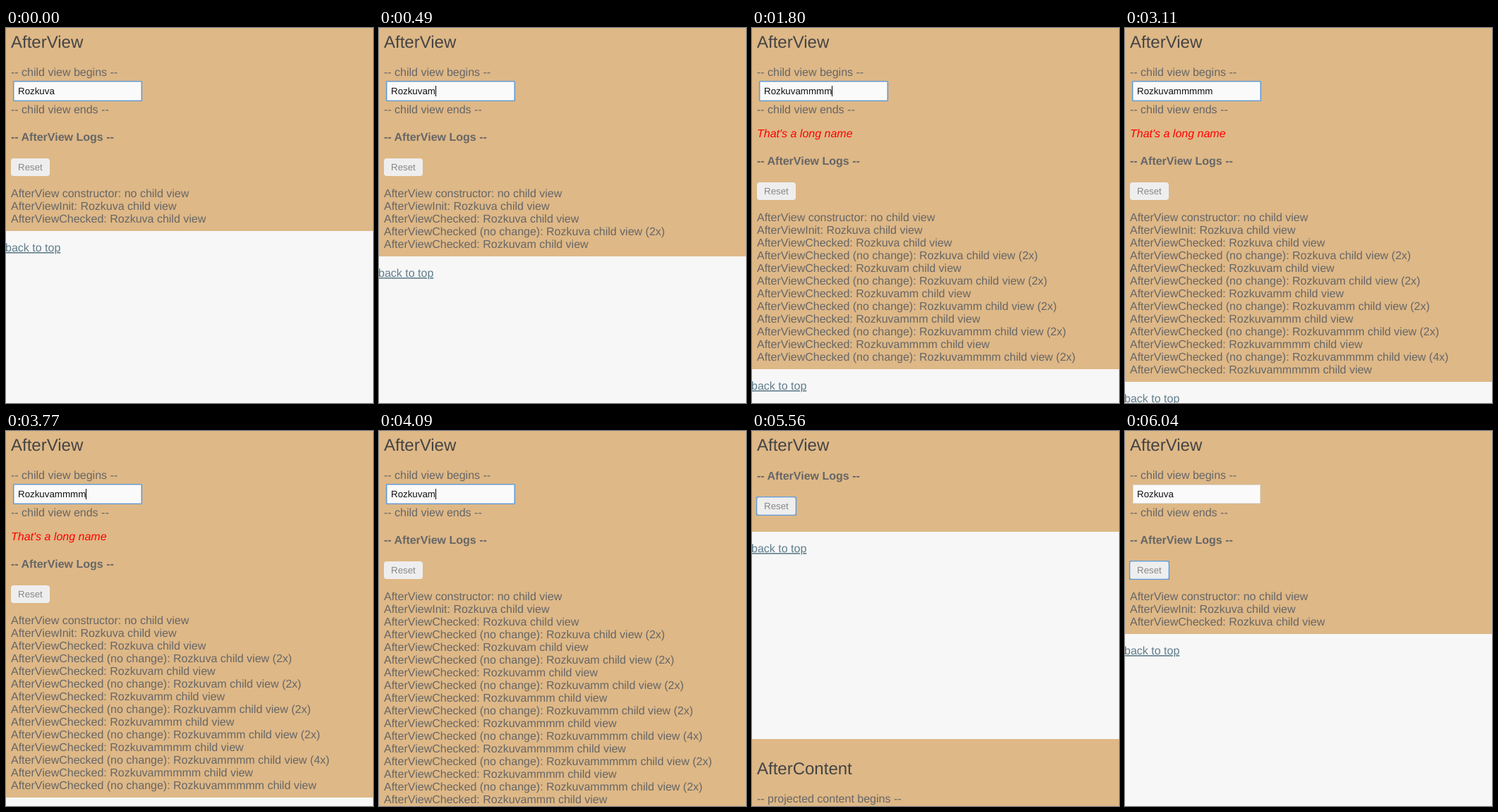
These frames come from a looping animation (520 px wide and 532 px high, 6540 ms). An HTML page:

```html
<!DOCTYPE html>
<html lang="en">
<head>
<meta charset="utf-8">
<title>AfterView</title>
<style>
  html, body { margin: 0; width: 100%; height: 100%; overflow: hidden; background: #f7f7f7; }
  svg { display: block; width: 520px; height: 532px; }
  text { font: 16px "Liberation Sans", Arial, sans-serif; fill: #666; text-rendering: geometricPrecision; }
  .title { font-size: 24px; fill: #444; }
  .bold { font-weight: bold; }
  .note { font-style: italic; fill: #f00; }
  .small { font-size: 13.333px; }
  .value { fill: #111; }
  .label { fill: #888; }
  .link { fill: #607d8b; text-decoration: underline; }
  .panel { fill: #deb887; }
  .field { fill: #fafafa; stroke: #ddd; }
  .button { fill: #eee; }
  .button.hover { fill: #cfd8dc; }
  .ring { fill: none; stroke: #5b9bdd; stroke-width: 1.4; }
</style>
</head>
<body>
<svg id="stage" viewBox="0 0 520 532">
  <rect class="panel" id="panel" width="520"/>
  <text class="title" x="7" y="28">AfterView</text>
  <g id="child">
    <text x="7" y="68">-- child view begins --</text>
    <rect class="field" x="11.5" y="76.5" width="180" height="26"/>
    <rect class="ring" id="fieldRing" x="10.6" y="75.6" width="181.8" height="27.8" rx="1"/>
    <text class="small value" id="value" x="17" y="94"></text>
    <rect id="caret" y="82" width="1" height="15"/>
    <text x="7" y="121">-- child view ends --</text>
  </g>
  <text class="note" id="note" x="7" y="155">That's a long name</text>
  <g id="logs">
    <text class="bold" x="7" y="160">-- AfterView Logs --</text>
    <rect class="button" id="button" x="7" y="185" width="55" height="25" rx="4"/>
    <rect class="ring" id="buttonRing" x="6.6" y="184.6" width="55.8" height="25.8" rx="1"/>
    <text class="small label" x="17" y="202">Reset</text>
    <g id="lines"></g>
  </g>
  <g id="below">
    <text class="link" x="-1" y="29">back to top</text>
    <g transform="translate(0 294)">
      <rect class="panel" width="520" height="300"/>
      <text class="title" x="7" y="50">AfterContent</text>
      <text x="7" y="90">-- projected content begins --</text>
    </g>
  </g>
</svg>
<script>
const LOOP = 6540;
const $ = id => document.getElementById(id);
const name = n => "Rozkuva" + "m".repeat(n);

// Each step lists only what changes; "typed" is the count of extra letters,
// "last" the repeat count of the newest log line.
const steps = [
  { at: 0, typed: 0, rows: 3, last: 2, caret: false, note: false, focus: "field", hover: false, child: true },
  { at: 330, typed: 1, rows: 4, last: 1, caret: true },
  { at: 490, rows: 5 },
  { at: 820, typed: 2, rows: 6 },
  { at: 980, rows: 7 },
  { at: 1140, typed: 3, rows: 9 },
  { at: 1470, typed: 4, rows: 10 },
  { at: 1800, rows: 12, last: 2, note: true },
  { at: 1960, typed: 5, rows: 13 },
  { at: 2120, caret: false },
  { at: 2780, caret: true },
  { at: 3110, caret: false },
  { at: 3610, typed: 4, rows: 14, last: 1, caret: true },
  { at: 3930, typed: 3, rows: 15 },
  { at: 4090, typed: 1, rows: 17, note: false },
  { at: 4910, caret: false },
  { at: 5070, hover: true },
  { at: 5230, focus: "button" },
  { at: 5560, rows: 0, hover: false, child: false },
  { at: 5720, typed: 0, rows: 3, child: true },
  { at: 5880, hover: true },
  { at: 6040, hover: false }
];
let previous = {};
const states = steps.map(step => previous = { ...previous, ...step });

// Letter counts in the order the hook reported them
const checked = [0, 1, 2, 3, 4, 5, 4, 3];
const intro = [
  "AfterView constructor: no child view",
  `AfterViewInit: ${name(0)} child view`,
  `AfterViewChecked: ${name(0)} child view`
];

function logLine(i, state) {
  if (i < 3) return intro[i];
  const k = (i - 3) >> 1;
  if (i % 2 === 0) return `AfterViewChecked: ${name(checked[k + 1])} child view`;
  const times = i === state.rows - 1 ? state.last : k === 4 ? 4 : 2;
  const suffix = times > 1 ? ` (${times}x)` : "";
  return `AfterViewChecked (no change): ${name(checked[k])} child view${suffix}`;
}

const show = (id, on) => $(id).setAttribute("visibility", on ? "inherit" : "hidden");
const moveY = (id, y) => $(id).setAttribute("transform", `translate(0 ${y})`);

function draw(state) {
  const shift = !state.child ? -91 : state.note ? 34 : 0;
  const bottom = 234 + shift + 18 * state.rows;
  $("panel").setAttribute("height", bottom);
  moveY("logs", shift);
  moveY("below", bottom);

  show("child", state.child);
  show("note", state.note);
  show("caret", state.caret);
  show("fieldRing", state.child && state.focus === "field");
  show("buttonRing", state.focus === "button");
  $("button").classList.toggle("hover", state.hover);

  $("value").textContent = name(state.typed);
  $("caret").setAttribute("x", Math.floor(68.9 + 11.1 * state.typed));
  $("lines").innerHTML = Array.from({ length: state.rows }, (_, i) =>
    `<text x="7" y="${240 + 18 * i}">${logLine(i, state)}</text>`).join("");
}

let current;
function tick() {
  const t = performance.now() % LOOP;
  const state = states.findLast(s => s.at <= t);
  if (state !== current) draw(current = state);
  requestAnimationFrame(tick);
}
tick();
</script>
</body>
</html>
```
